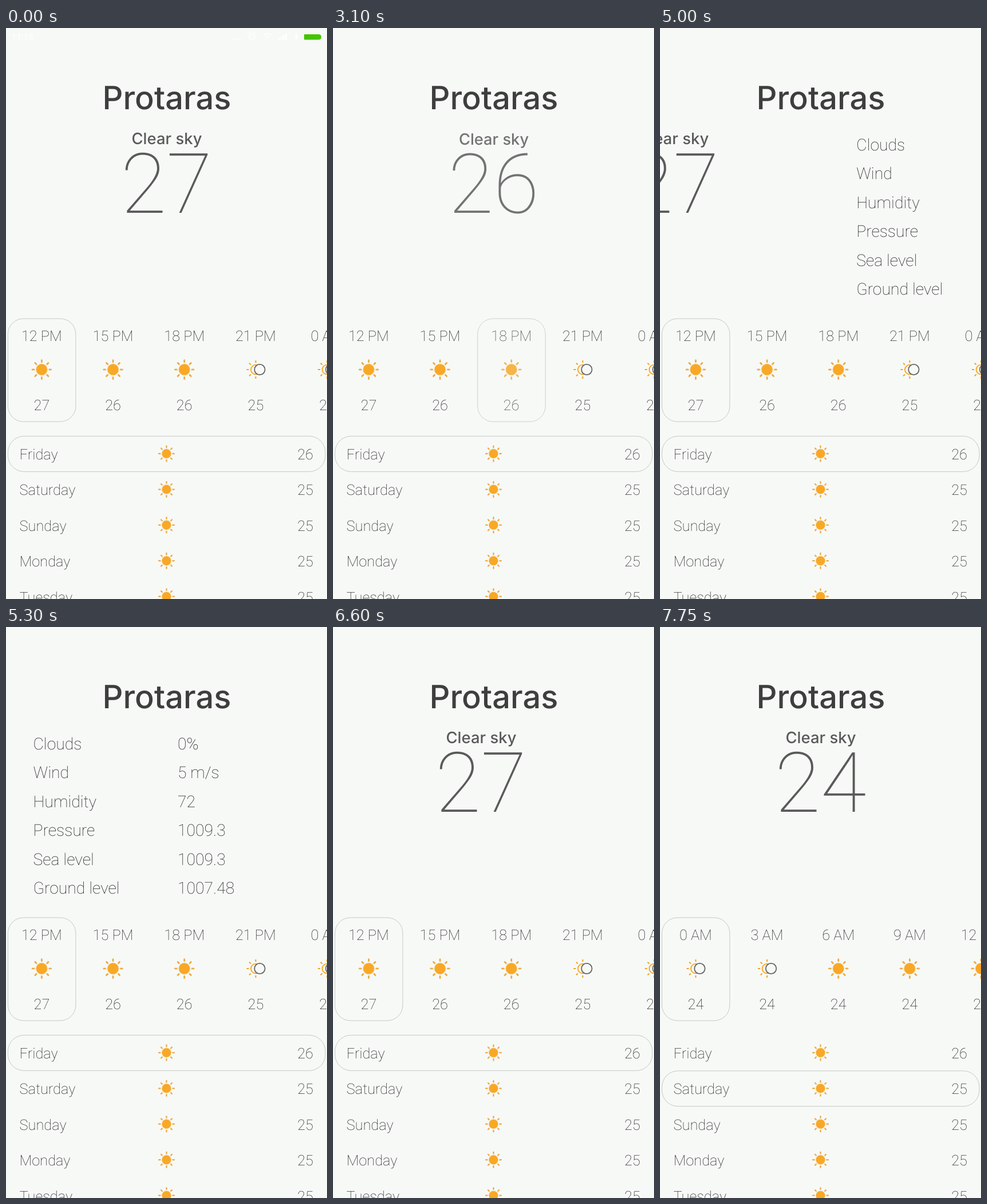
An HTML page for the animation above (8 s loop, 561 by 998 pixels).

```html
<!DOCTYPE html>
<html lang="en">
<head>
<meta charset="utf-8">
<title>Weather</title>
<style>
  html, body { margin: 0; width: 100%; height: 100%; overflow: hidden; background: #f7f9f7; }
  svg { display: block; width: 561px; height: 998px; overflow: hidden; }
  text { font-family: Roboto, sans-serif; font-weight: 200; fill: #1c1c1c; text-rendering: geometricPrecision; }
  .mid { text-anchor: middle; }
  .end { text-anchor: end; }
  .head { font-family: Inter, sans-serif; text-anchor: middle; }
  .frame { fill: none; stroke: #c6c8c6; stroke-width: 1; }
</style>
</head>
<body>
<svg id="stage" viewBox="0 0 561 998"></svg>
<script>
const LOOP = 8000, W = 561, BG = '#f7f9f7';
const COL = 124.67, ROW = 62.4;

// Each tap: press time, length, selected hour, selected day, big number
const START = { hour: 0, day: 0, temp: 27 };
const TAPS = [
  { at: 1920, len: 330, hour: 1, day: 0, temp: 26 },
  { at: 2870, len: 330, hour: 2, day: 0, temp: 26 },
  { at: 3570, len: 330, hour: 3, day: 0, temp: 25 },
  { at: 4080, len: 390, hour: 0, day: 0, temp: 27 },
  { at: 7250, len: 400, hour: 0, day: 1, temp: 24, onDay: true }
];
const SWIPES = [{ at: 4843, to: 1 }, { at: 6200, to: 0 }];
const SWIPE_LEN = 700;

const HOURS = [
  [['12 PM', 27], ['15 PM', 26], ['18 PM', 26], ['21 PM', 25, 1], ['0 AM', 24, 1]],
  [['0 AM', 24, 1], ['3 AM', 24, 1], ['6 AM', 24], ['9 AM', 24], ['12 PM', 25]]
];
const DAYS = [['Friday', 26], ['Saturday', 25], ['Sunday', 25], ['Monday', 25], ['Tuesday', 25]];
const DETAILS = [['Clouds', '0%'], ['Wind', '5 m/s'], ['Humidity', '72'],
  ['Pressure', '1009.3'], ['Sea level', '1009.3'], ['Ground level', '1007.48']];

const clamp = v => Math.min(1, Math.max(0, v));
const label = (s, x, y, size, cls = '', extra = '') =>
  `<text class="${cls}" x="${x}" y="${y}" font-size="${size}" ${extra}>${s}</text>`;
const group = (id, body, extra = '') => `<g id="${id}" ${extra}>${body}</g>`;

function rays(angles, r1, r2, style) {
  const d = angles.map(a => {
    const c = Math.cos(a * Math.PI / 180), s = Math.sin(a * Math.PI / 180);
    return `M${(c * r1).toFixed(2)} ${(s * r1).toFixed(2)}L${(c * r2).toFixed(2)} ${(s * r2).toFixed(2)}`;
  }).join('');
  return `<path d="${d}" fill="none" ${style}/>`;
}

function sun(x, y, k = 1) {
  const all = [0, 45, 90, 135, 180, 225, 270, 315];
  return `<g transform="translate(${x} ${y}) scale(${k})">
    <circle r="10.3" fill="#f0cf96"/><circle r="9.4" fill="#f9a825"/>
    ${rays(all, 13.2, 16.4, 'stroke="#ecbd70" stroke-width="3" stroke-linecap="round"')}
    ${rays(all, 13.6, 16, 'stroke="#eea536" stroke-width="1.7" stroke-linecap="round"')}</g>`;
}

function veiled(x, y) {
  return `<g transform="translate(${x} ${y})">
    <circle r="8.4" fill="none" stroke="#f9a825" stroke-width="1.9"/>
    ${rays([90, 135, 180, 225, 270], 12, 16, 'stroke="#f5a21c" stroke-width="2"')}
    <circle cx="7" r="9.2" fill="${BG}" stroke="#666" stroke-width="1.8"/></g>`;
}

function hourCard([name, temp, night], i, set) {
  const x = 62.4 + COL * i;
  return group(`hour${set}${i}`,
    `<rect class="frame" x="${x - 59}" y="508" width="118.5" height="180" rx="27"/>` +
    label(name, x, 547, 25.4, 'mid') +
    (night ? veiled : sun)(x, 597) +
    label(temp, x, 668, 25.4, 'mid'));
}

function dayRow([name, temp], i) {
  const y = 744.4 + ROW * i;
  return group('day' + i,
    `<rect class="frame" x="3.5" y="${y - 31}" width="554.5" height="62" rx="28"/>` +
    label(name, 23.5, y + 9.6, 25.4) + sun(280.5, y - .4, .82) +
    label(temp, 537, y + 9.6, 25.4, 'end'));
}

function statusBar() {
  const dots = [399, 404, 409].map(x => `<circle cx="${x}" cy="20" r="1.3"/>`).join('');
  const bars = [0, 1, 2, 3].map(i =>
    `<rect x="${476 + 4 * i}" y="${18 - 2.6 * i}" width="2.6" height="${3 + 2.6 * i}"/>`).join('');
  return label('11:15', 10, 20.5, 15, '', 'style="fill:#fff;font-weight:400"') +
    `<g fill="#fff">${dots}${bars}<path d="M509 9l-5 7h3l-1 6 5-8h-3z"/></g>
     <g fill="none" stroke="#fff" stroke-width="1.5">
       <circle cx="430" cy="15" r="5.5"/><path d="M430 12v3h3M424 9l3-2M436 9l-3-2M450 13q7-6 14 0M453 17q4-3 8 0"/></g>
     <path fill="#43c400" d="M522 11h24q5 0 5 4.7t-5 4.8h-24q-1 0-1-1v-7.500q0-1 1-1z"/>`;
}

const stage = document.getElementById('stage');
stage.innerHTML =
  `<rect width="561" height="998" fill="${BG}"/>` +
  group('status', statusBar()) +
  label('Protaras', 281, 141.500, 56, 'head', 'style="font-weight:450;fill:#3e3e3e"') +
  group('now',
    label('Clear sky', 281, 203, 27.5, 'head', 'style="font-weight:450;fill:#5a5a5a"') +
    label('27', 280.5, 323, 146, 'mid', 'id="temp" style="font-weight:100;fill:#5a5a5a"')) +
  group('details', DETAILS.map(([k, v], i) => {
    const y = 214 + 50.4 * i;
    return label(k, 39.5, y, 28.4) + label(v, 292, y, 28.4);
  }).join('')) +
  HOURS.map((list, s) => group('set' + s, list.map((h, i) => hourCard(h, i, s)).join(''))).join('') +
  DAYS.map(dayRow).join('');

const el = id => document.getElementById(id);
const show = (node, on) => node.setAttribute('visibility', on ? 'inherit' : 'hidden');
const hourEls = HOURS.map((list, s) => list.map((_, i) => el(`hour${s}${i}`)));
const dayEls = DAYS.map((_, i) => el('day' + i));
const [status, now, temp, details] = ['status', 'now', 'temp', 'details'].map(el);

// Quick dim to a fifth, then an eased return
function dim(p) {
  if (p <= 0 || p >= 1) return 1;
  if (p < 1 / 3) return 1 - 2.4 * p;
  return 1 - .8 * (1.5 * (1 - p)) ** 2;
}

function glide(p) {
  const q = 1 - (1 - clamp(p)) ** 2.5;
  return q * q * (3 - 2 * q);
}

function render(t) {
  let state = START, glow = 1, pressed = null;
  for (const tap of TAPS) {
    const p = (t - tap.at) / tap.len;
    if (p >= 1 / 3) state = tap;
    if (p > 0 && p < 1) { glow = dim(p); pressed = tap; }
  }

  const lift = 25 * clamp((t - 1800) / 250) ** 2;
  status.setAttribute('transform', `translate(0 ${-lift})`);

  let page = 0;
  for (const s of SWIPES) if (t >= s.at) page += (s.to - page) * glide((t - s.at) / SWIPE_LEN);
  const scale = .95 + .05 * glow;
  now.setAttribute('transform', `translate(${281 - W * page} 335) scale(${scale}) translate(-281 -335)`);
  now.setAttribute('opacity', glow);
  temp.textContent = state.temp;
  details.setAttribute('transform', `translate(${W * (1 - page)} 0)`);

  hourEls.forEach((list, s) => {
    show(el('set' + s), s === state.day);
    list.forEach((card, i) => {
      show(card.firstChild, i === state.hour);
      card.setAttribute('opacity', pressed && !pressed.onDay && pressed.hour === i ? glow : 1);
    });
  });
  dayEls.forEach((row, i) => {
    show(row.firstChild, i === state.day);
    row.setAttribute('opacity', pressed && pressed.onDay && pressed.day === i ? glow : 1);
  });
}

const origin = performance.now();
function tick() {
  render((performance.now() - origin) % LOOP);
  requestAnimationFrame(tick);
}
render(0);
tick();
</script>
</body>
</html>
```
